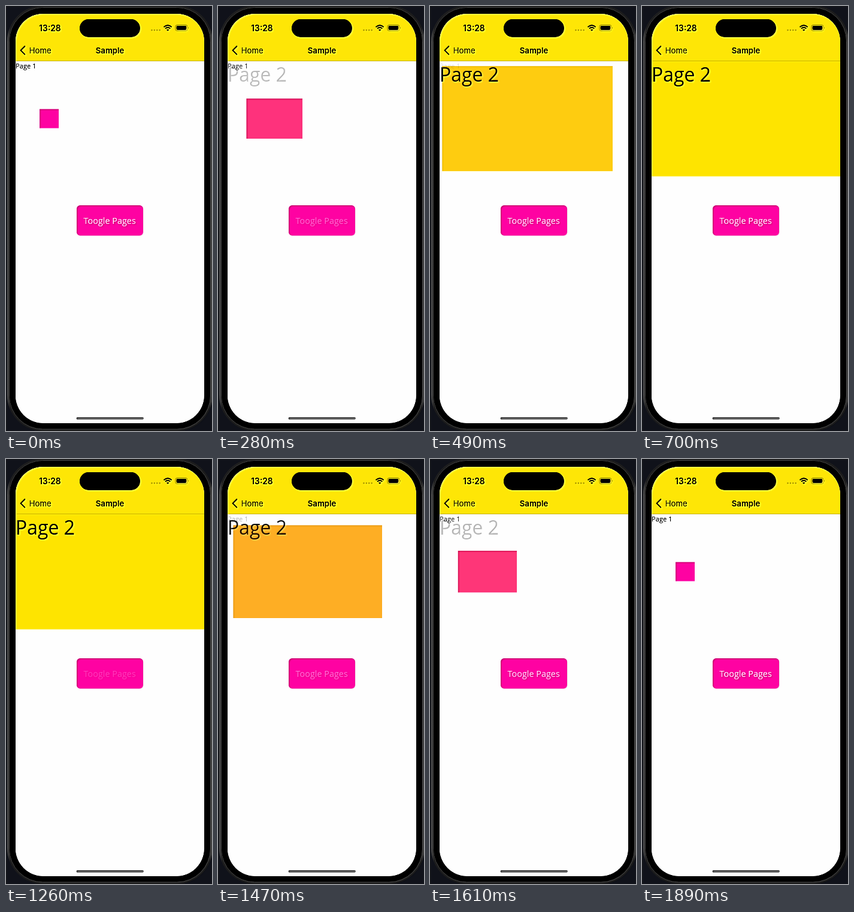
Recreate the animation shown at these times as an HTML page. Size 344 by 708 pixels, loop 2310 ms.

```html
<!DOCTYPE html>
<html lang="en">
<head>
<meta charset="utf-8">
<title>Toggle pages</title>
<style>
  html, body { margin: 0; width: 100%; height: 100%; overflow: hidden; background: #0d0e12; }
  svg { display: block; width: 344px; height: 708px; }
  .ui { font: 13.2px Inter, sans-serif; }
  .bold { font-weight: 600; }
  .clock { font-size: 13.8px; }
  .page { font-family: "Open Sans", sans-serif; }
</style>
</head>
<body>
<svg viewBox="0 0 344 708">
  <defs>
    <clipPath id="screen"><rect x="16" y="13" width="315" height="682" rx="46"/></clipPath>
    <linearGradient id="metal" x1="0" x2="1" y1="0" y2="0">
      <stop offset="0" stop-color="#4a4a4a"/>
      <stop offset=".015" stop-color="#1c1c1c"/>
      <stop offset=".985" stop-color="#1c1c1c"/>
      <stop offset="1" stop-color="#4a4a4a"/>
    </linearGradient>
    <!-- Diagonal sharpening: adds the brightness step from the upper left, at half range to avoid clipping -->
    <filter id="sharpen" filterUnits="userSpaceOnUse" x="0" y="0" width="344" height="708" color-interpolation-filters="sRGB">
      <feColorMatrix in="SourceGraphic" result="luma"
        values=".3 .59 .11 0 0  .3 .59 .11 0 0  .3 .59 .11 0 0  0 0 0 1 0"/>
      <feOffset in="luma" dx="1" dy="1"/>
      <feGaussianBlur stdDeviation=".8" result="shifted"/>
      <feComposite in="SourceGraphic" in2="luma" operator="arithmetic" k2=".5" k3=".25"/>
      <feComposite in2="shifted" operator="arithmetic" k2="1" k3="-.25"/>
      <feColorMatrix values="1 0 0 0 0  0 1 0 0 0  0 0 1 0 0  0 0 0 2 0"/>
    </filter>
  </defs>

  <g filter="url(#sharpen)">
    <!-- phone body -->
    <rect width="344" height="708" fill="#11131a"/>
    <rect x="2" y="-1" width="343" height="709" rx="60" fill="url(#metal)"/>
    <rect x="5.5" y="2.5" width="336" height="702.5" rx="56" fill="#000" stroke="#3a3a3a"/>

    <g clip-path="url(#screen)">
      <rect x="16" y="13" width="315" height="682" fill="#fff"/>
      <rect x="16" y="13" width="315" height="79" fill="#ffe605"/>

      <rect id="box"/>
      <text id="one" class="page" x="16" y="103.5" font-size="11.2">Page 1</text>
      <text id="two" class="page" x="16" y="125.7" font-size="32">Page 2</text>
      <rect x="16" y="91" width="315" height="1" fill="#c4b000" opacity=".7"/>

      <!-- button -->
      <rect x="119" y="333" width="111" height="50.5" rx="6" opacity=".2"/>
      <rect x="118" y="332" width="111" height="50.5" rx="6" fill="#ff00a0"/>
      <text id="label" class="page" x="173.2" y="363" font-size="14.4" text-anchor="middle" fill="#fff">Toogle Pages</text>

      <rect x="117.5" y="685" width="112.5" height="4" rx="2" fill="#6a6a6a"/>
    </g>

    <!-- status bar -->
    <rect x="123" y="22" width="101" height="30" rx="15"/>
    <text class="ui bold clock" x="73.5" y="41.5" text-anchor="middle">13:28</text>
    <path d="M243.5 40.2h13.6" stroke="#b5a30a" stroke-width="2.6" stroke-linecap="round" stroke-dasharray="0 4.4"/>
    <g fill="none" stroke="#000" stroke-width="1.9">
      <path d="M263.6 35.1Q270.2 29.3 276.8 35.1"/>
      <path d="M266 37.6Q270.2 34 274.4 37.6"/>
    </g>
    <path d="M268 39.6Q270.2 37.9 272.4 39.6L270.2 41.8Z"/>
    <rect x="283" y="31.5" width="20" height="10" rx="3" fill="none" stroke="#000" stroke-opacity=".4" stroke-width=".9"/>
    <rect x="284.6" y="33.1" width="16.8" height="6.8" rx="1.8"/>
    <path d="M304.3 35Q306 36.5 304.3 38Z" opacity=".5"/>

    <!-- navigation bar -->
    <path d="M31.3 67.2L24.6 73.9L31.3 80.6" fill="none" stroke="#000" stroke-width="2" stroke-linecap="round" stroke-linejoin="round"/>
    <text class="ui" x="38.8" y="78.6">Home</text>
    <text class="ui bold" x="173.5" y="78.6" text-anchor="middle">Sample</text>
  </g>
</svg>

<script>
const LOOP = 2310, STEP = 70, DURATION = 470;
const OPEN = { press: 70, start: 243 };
const CLOSE = { press: 1260, start: 1430 };
const SMALL = { x: 56.2, y: 171.7, right: 88.1, bottom: 203.6 };
const LARGE = { x: 16, y: 91.6, right: 331, bottom: 283.8 };

const el = id => document.getElementById(id);
const [box, one, two, label] = ['box', 'one', 'two', 'label'].map(el);
const mix = (a, b, p) => a + (b - a) * p;

// Cubic ease-out, clamped to 0..1
function ease(t, start) {
  const k = Math.min(1, Math.max(0, (t - start) / DURATION));
  return 1 - (1 - k) ** 3;
}

function draw(t) {
  const opened = ease(t, OPEN.start), closed = ease(t, CLOSE.start);
  const p = opened - closed;
  const side = key => mix(SMALL[key], LARGE[key], p);

  box.setAttribute('x', side('x'));
  box.setAttribute('y', side('y'));
  box.setAttribute('width', side('right') - side('x'));
  box.setAttribute('height', side('bottom') - side('y'));
  box.setAttribute('fill', `rgb(255, ${mix(0, 229, p)}, ${mix(160, 0, p)})`);
  one.style.opacity = 1 - p;
  two.style.opacity = p;

  // The label dims on touch and recovers with the transition
  const shown = t < OPEN.press ? 1 : t < CLOSE.press ? opened : closed;
  label.style.opacity = mix(.2, 1, shown);
}

function tick() {
  const t = performance.now() % LOOP;
  draw(Math.floor(t / STEP) * STEP);
  requestAnimationFrame(tick);
}
tick();
</script>
</body>
</html>
```
